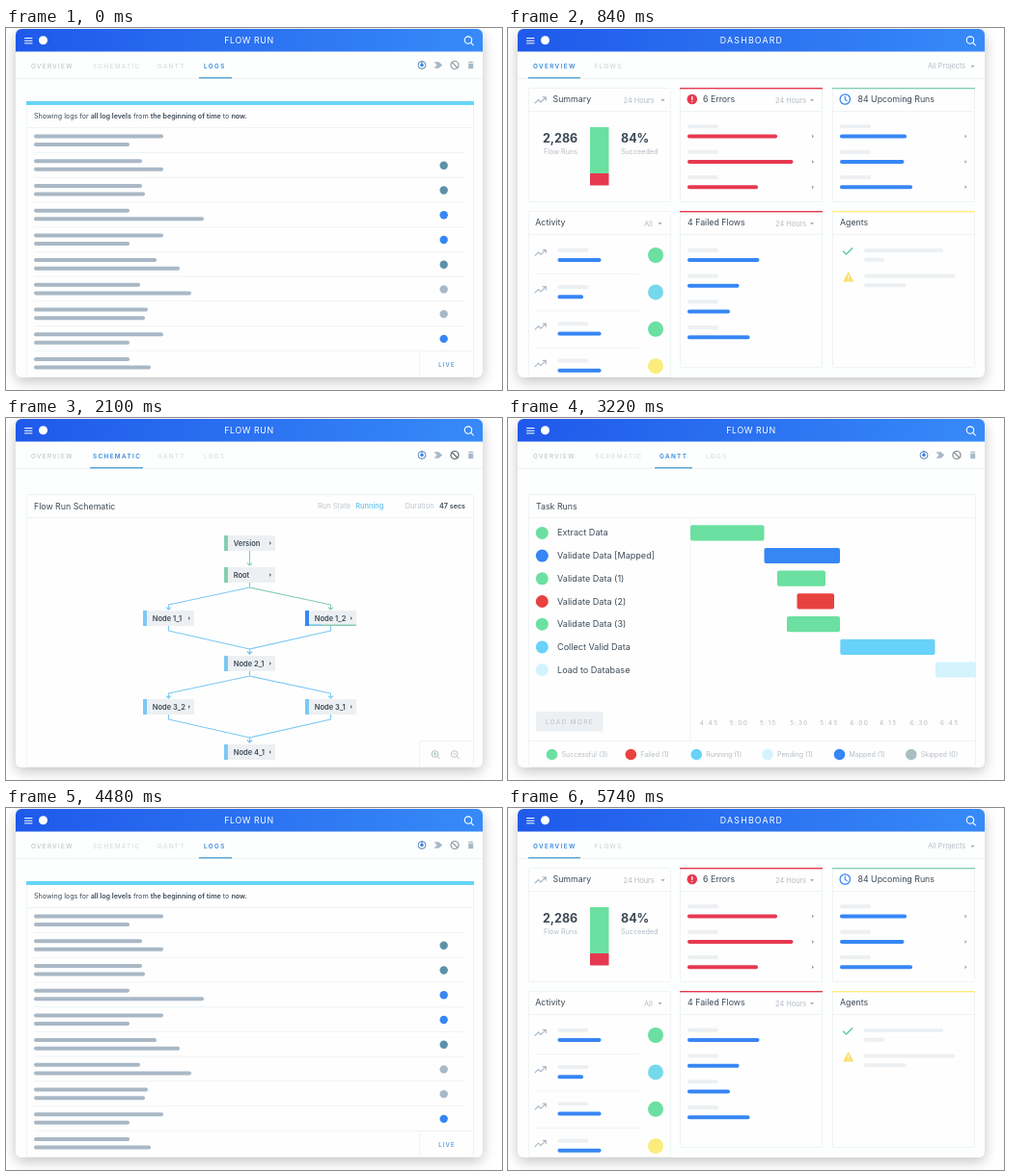
Write an HTML page that moves like this. It is 514 by 376 pixels and loops after 6.82 s.

```html
<!DOCTYPE html>
<html lang="en">
<head>
<meta charset="utf-8">
<style>
  html, body { margin: 0; width: 100%; height: 100%; overflow: hidden; background: #fff; }
  #card { position: absolute; left: 10px; top: 1px; width: 484px; height: 362px; border-radius: 6px;
    background: #fdfefe; box-shadow: 0 4px 14px rgba(0, 0, 0, .24); }
  svg { position: absolute; left: 0; top: 0; width: 514px; height: 376px; font-family: Inter, sans-serif; }
</style>
</head>
<body>
<div id="card"></div>
<svg id="stage" viewBox="0 0 514 376"></svg>
<script>
const GREEN = '#6be0a0', RED = '#e63950', BLUE = '#3786f5', CYAN = '#69d2fa', PALE = '#d3f3fd',
  YELLOW = '#fbec7d', INK = '#3d4a57', MUTED = '#b4bcc4', SLATE = '#a9b8c6', GHOST = '#edf0f2',
  EDGE = '#eff3f4', MINT = '#86cfb0', SKY = '#7cc9f2', STEEL = '#5c91a8';

// Drawing helpers, each returning SVG markup
const rect = (x, y, w, h, fill, rx = 0, more = '') =>
  `<rect x="${x}" y="${y}" width="${w}" height="${h}" fill="${fill}" rx="${rx}" ${more}/>`;
const dot = (x, y, r, fill, more = '') => `<circle cx="${x}" cy="${y}" r="${r}" fill="${fill}" ${more}/>`;
const ring = (x, y, r, color, w = 1) => dot(x, y, r, 'none', `stroke="${color}" stroke-width="${w}"`);
const path = (d, color, w = 1) =>
  `<path d="${d}" fill="none" stroke="${color}" stroke-width="${w}" stroke-linecap="round" stroke-linejoin="round"/>`;
const fillPath = (d, color) => `<path d="${d}" fill="${color}"/>`;
const text = (x, y, str, size, color = INK, spacing = 0, weight = 400) =>
  `<text x="${x}" y="${y}" font-size="${size}" fill="${color}" letter-spacing="${spacing}" font-weight="${weight}">${str}</text>`;
const bar = (x, end, y, color) => rect(x, y - 2, end - x, 4, color, 1.8);
const hline = (x, end, y) => rect(x, y - .5, end - x, 1, EDGE);
const title = (x, y, str) => text(x, y, str, 8.8);
const frame = (x, y, w, h) => rect(x + .5, y + .5, w - 1, h - 1, '#fefefe', 1, `stroke="${EDGE}"`);
const caret = (x, y) => fillPath(`M${x - 2} ${y - 1}h4l-2 2.4z`, '#a5adb5');
const arrow = (x, y, color = '#9aa3ab') => fillPath(`M${x - 1} ${y - 2}v4l2-2z`, color);
const select = (x, y, str, caretX) => text(x, y, str, 7.4, MUTED) + caret(caretX, y - 2.5);
const trend = (x, y) => path(`M${x} ${y + 3}l3.5-3.5 2.5 2.5 5-5M${x + 8} ${y - 3.2}h3.3v3.3`, SLATE, 1.1);
const lens = (x, y, r, color, w) =>
  ring(x, y, r, color, w) + path(`M${x + r * .75} ${y + r * .75}l${r * .7} ${r * .7}`, color, w);

function header(name, x, spacing) {
  return fillPath('M10 24.5V7a6 6 0 0 1 6-6H488a6 6 0 0 1 6 6V24.5z', 'url(#sky)') +
    path('M19.5 10.5h7.5M19.5 13.2h7.5M19.5 15.9h7.5', '#fff', 1) + dot(38.5, 12.7, 4.5, '#fff') +
    text(x, 16.2, name, 8.8, '#fff', spacing) + lens(479, 12.6, 3.7, '#fff', 1.1) + hline(10, 494, 52.5);
}

function tab(x, str, active, start, end, color) {
  return text(x, 42.2, str, 6.3, active ? '#3288dd' : color, 1.4, active ? 600 : 400) +
    (active ? rect(start, 51, end - start, 1.5, '#5aa8d8') : '');
}

function runPage(active, blockColor = '#8d979f') {
  const tabs = [['OVERVIEW', 26, 22, 75], ['SCHEMATIC', 90, 87, 142], ['GANTT', 157, 152, 191], ['LOGS', 205, 200, 234]];
  return header('FLOW RUN', 226.3, .6) +
    tabs.map(([s, x, a, b], i) => tab(x, s, s === active, a, b, i ? '#d2d7dc' : '#b3bac1')).join('') +
    ring(431, 38.5, 3.9, '#587fa8', 1) + dot(431, 38.5, 1.8, BLUE) + path('M431 34.6v2', BLUE) +
    fillPath('M443.5 35.2h5l3.8 3.3-3.8 3.3h-5l3-3.3z', SLATE) +
    ring(465, 38.5, 4, blockColor, 1.2) + path('M462.2 35.7l5.6 5.6', blockColor, 1.2) +
    fillPath('M478.8 35.2h1.6l.6-.8h1.4l.6.8h1.6v1h-5.8zM479.2 37h5v5.3h-5z', SLATE);
}

function logs() {
  const ends = [[163, 128], [141, 163], [141, 144], [128, 205], [163, 128], [156, 180], [139, 192], [147, 144], [163, 128], [128, 150]];
  const states = [0, STEEL, STEEL, BLUE, BLUE, STEEL, SLATE, SLATE, BLUE];
  const bold = s => `<tspan font-weight="600">${s}</tspan>`;
  return runPage('LOGS') + frame(21, 76, 464, 287) + rect(21, 76, 464, 4, '#66d5f8') +
    text(29, 94.3, `Showing logs for ${bold('all log levels')} from ${bold('the beginning of time')} to ${bold('now.')}`, 7.15) +
    hline(21, 485, 103.5) +
    ends.map(([a, b], i) => {
      const y = 112.5 + 25.72 * i;
      return bar(29, a, y, SLATE) + bar(29, b, y + 8.6, SLATE) + (i < 9 ? hline(29, 475, y + 17) : '') +
        (states[i] ? dot(453.7, y + 4.6, 4.2, states[i]) : '');
    }).join('') +
    frame(428, 335, 57, 28) + text(448.3, 352, 'LIVE', 6.1, '#3f8fd6', 1.1, 500);
}

function dashboard() {
  const card = (x, y, h, top) => frame(x, y, 148, h) + (top ? rect(x, y, 148, 1.4, top) : '') + hline(x, x + 148, y + 24.5);
  const list = (x, y, step, ends, color, arrowX) => ends.map((end, i) => {
    const top = y + step * i;
    return bar(x, x + 32, top, GHOST) + bar(x, end, top + 10.2, color) + (arrowX ? arrow(arrowX, top + 10.2) : '');
  }).join('');
  return header('DASHBOARD', 219.8, 1.2) +
    tab(26, 'OVERVIEW', true, 21, 75) + tab(89.5, 'FLOWS', false, 0, 0, '#c8ced4') + select(435, 42.3, 'All Projects', 481.5) +
    card(21, 62, 119) + trend(28, 75) + title(46.5, 77.4, 'Summary') + select(119.5, 77.6, '24 Hours', 160.5) +
    text(36, 119, '2,286', 12.5, INK, 0, 700) + text(117, 119, '84%', 12.5, INK, 0, 700) +
    text(37, 131, 'Flow Runs', 7.2, MUTED) + text(117, 131, 'Succeeded', 7.2, MUTED) +
    rect(85, 103, 19.5, 48, GREEN) + rect(85, 151, 19.5, 12.5, RED) +
    card(178, 62, 119, RED) + dot(190.8, 74, 5.3, RED) + path('M190.8 71.3v3M190.8 76.5v.1', '#fff', 1.3) +
    title(202, 77.4, '6 Errors') + select(277, 77.6, '24 Hours', 315) +
    list(186, 102.3, 26.4, [279, 295.5, 259], RED, 316) +
    card(336, 62, 119, MINT) + ring(349.3, 74, 5.2, BLUE, 1.3) + path('M349.3 71v3.2l2 1.4', BLUE, 1.1) +
    title(362.5, 77.4, '84 Upcoming Runs') + list(344, 102.3, 26.4, [413, 410.5, 419], BLUE, 474.5) +
    card(21, 190, 173) + title(28.3, 205.3, 'Activity') + select(141, 205.6, 'All', 157.5) +
    list(51.5, 230.7, 38.3, [96.5, 78, 96.5, 96.5], BLUE) +
    [GREEN, '#74d9ea', GREEN, YELLOW].map((c, i) => {
      const y = 236 + 38.4 * i;
      return trend(28, y - 2.6) + dot(153, y, 8, c) + (i < 3 ? hline(28, 136, y + 19.5) : '');
    }).join('') +
    card(178, 190, 163, RED) + title(186, 205.3, '4 Failed Flows') + select(277, 205.6, '24 Hours', 315) +
    list(186, 230.7, 26.8, [260.5, 239.5, 230, 250.5], BLUE) +
    card(336, 190, 163, YELLOW) + title(344, 205.3, 'Agents') +
    path('M347.5 232l3 3 6.3-6.3', '#56c8a4', 1.4) + bar(369, 451, 231, GHOST) + bar(369, 390, 240.7, GHOST) +
    fillPath('M352.7 253l5.6 10.5h-11.2z', '#f8e06c') + path('M352.7 257v2.6M352.7 261.6v.1', '#fff', 1) +
    bar(369, 463.5, 257.5, GHOST) + bar(369, 412.5, 267.3, GHOST);
}

function schematic() {
  const node = (x, y, str, color) => rect(x, y, 53, 16, '#edf0f3') + rect(x, y, 4, 16, color) +
    text(x + 9.7, y + 11, str, 7.5, INK, 0, 600) + arrow(x + 48, y + 8, '#6c7782');
  const edge = (x, y, endX, endY, color) =>
    path(`M${x} ${y}V${y + 5}L${endX} ${endY - 6}V${endY - 1}m-2.2-2.2l2.2 2.2 2.2-2.2`, color, 1.1);
  const L = 168.5, C = 252.5, R = 336.5;
  return runPage('SCHEMATIC', '#565f68') + frame(21, 79, 464, 284) + hline(21, 485, 103.5) +
    title(29, 94.5, 'Flow Run Schematic') + text(323, 94.2, 'Run State', 7.5, '#c0c7cd') +
    text(362.3, 94.2, 'Running', 7.4, '#5fc2ee', 0, 500) + text(413.5, 94.2, 'Duration', 7.5, '#c0c7cd') +
    text(449, 94.2, '47 secs', 7.2, INK, 0, 600) +
    edge(C, 138, C, 154, MINT) + edge(C, 171, L, 200, SKY) + edge(C, 171, R, 200, MINT) +
    edge(L, 216, C, 246, SKY) + edge(R, 216, C, 246, SKY) +
    edge(C, 263, L, 292, SKY) + edge(C, 263, R, 292, SKY) +
    edge(L, 308, C, 338, SKY) + edge(R, 308, C, 338, SKY) +
    node(226, 122, 'Version', MINT) + node(226, 155, 'Root', MINT) +
    node(142, 200, 'Node 1_1', SKY) + node(310, 200, 'Node 1_2', BLUE) + rect(314, 214.5, 49, 1.5, MINT) +
    rect(314, 214.5, 13, 1.5, SKY) +
    node(226, 247, 'Node 2_1', SKY) + node(142, 292, 'Node 3_2', SKY) + node(310, 292, 'Node 3_1', SKY) +
    node(226, 339, 'Node 4_1', SKY) +
    frame(428, 335, 57, 28) +
    lens(444.5, 349, 3.4, '#9dbfb2', .9) + path('M443 349h3M444.5 347.5v3', '#9dbfb2', .8) +
    lens(464.7, 349, 3.4, '#b5bfc3', .9) + path('M463.2 349h3', '#b5bfc3', .8);
}

function gantt() {
  const CRIMSON = '#e8423f', GRAY = '#a9bfc4';
  const tasks = [
    ['Extract Data', GREEN, 189, 265.5], ['Validate Data [Mapped]', BLUE, 265.5, 344], ['Validate Data (1)', GREEN, 279, 329],
    ['Validate Data (2)', CRIMSON, 299.5, 338], ['Validate Data (3)', GREEN, 289, 344],
    ['Collect Valid Data', CYAN, 344.3, 442.5], ['Load to Database', PALE, 443, 485]];
  const legend = [['Successful (3)', GREEN, 45.5], ['Failed (1)', CRIMSON, 127.3], ['Running (1)', CYAN, 195.3],
    ['Pending (1)', PALE, 269], ['Mapped (1)', BLUE, 343.5], ['Skipped (0)', GRAY, 417.8]];
  const ticks = Array.from({ length: 9 }, (_, i) => {
    const min = 285 + 15 * i;
    return text(198.7 + 31.15 * i, 319, `${Math.floor(min / 60)}:${String(min % 60).padStart(2, '0')}`, 6.5, MUTED, 1.4);
  });
  return runPage('GANTT', '#7b858e') + frame(21, 79, 464, 284) + hline(21, 485, 103.5) + hline(21, 485, 335.5) +
    rect(188.5, 104, 1, 231, EDGE) + title(29, 94.5, 'Task Runs') +
    tasks.map(([s, c, a, b], i) => {
      const y = 119.4 + 23.7 * i;
      return dot(35.3, y, 6.5, c) + text(51, y + 3, s, 9.1) + rect(a, y - 8.2, b - a, 16.2, c, 2);
    }).join('') +
    rect(29, 305, 69.5, 20.5, '#edf0f3', 1) + text(39, 317.8, 'LOAD MORE', 6.2, '#b5bfca', 1.5) + ticks.join('') +
    legend.map(([s, c, x]) => dot(x, 349.5, 5.8, c) + text(x + 10, 352.2, s, 7, MUTED)).join('');
}

const scenes = { logs, dashboard, schematic, gantt };
const schedule = [[840, 'logs'], [2100, 'dashboard'], [3220, 'schematic'], [4480, 'gantt'], [5740, 'logs'], [6820, 'dashboard']];
const LOOP = 6820;

const stage = document.getElementById('stage');
stage.innerHTML = '<defs><linearGradient id="sky"><stop stop-color="#1f59ea"/><stop offset="1" stop-color="#378af8"/></linearGradient></defs>' +
  Object.entries(scenes).map(([id, draw]) => `<g id="${id}">${draw()}</g>`).join('');
const groups = stage.querySelectorAll(':scope > g');

const start = performance.now();
function render() {
  const t = (performance.now() - start) % LOOP;
  const current = schedule.find(([end]) => t < end)[1];
  for (const g of groups) g.style.display = g.id === current ? '' : 'none';
  requestAnimationFrame(render);
}
render();
</script>
</body>
</html>
```
